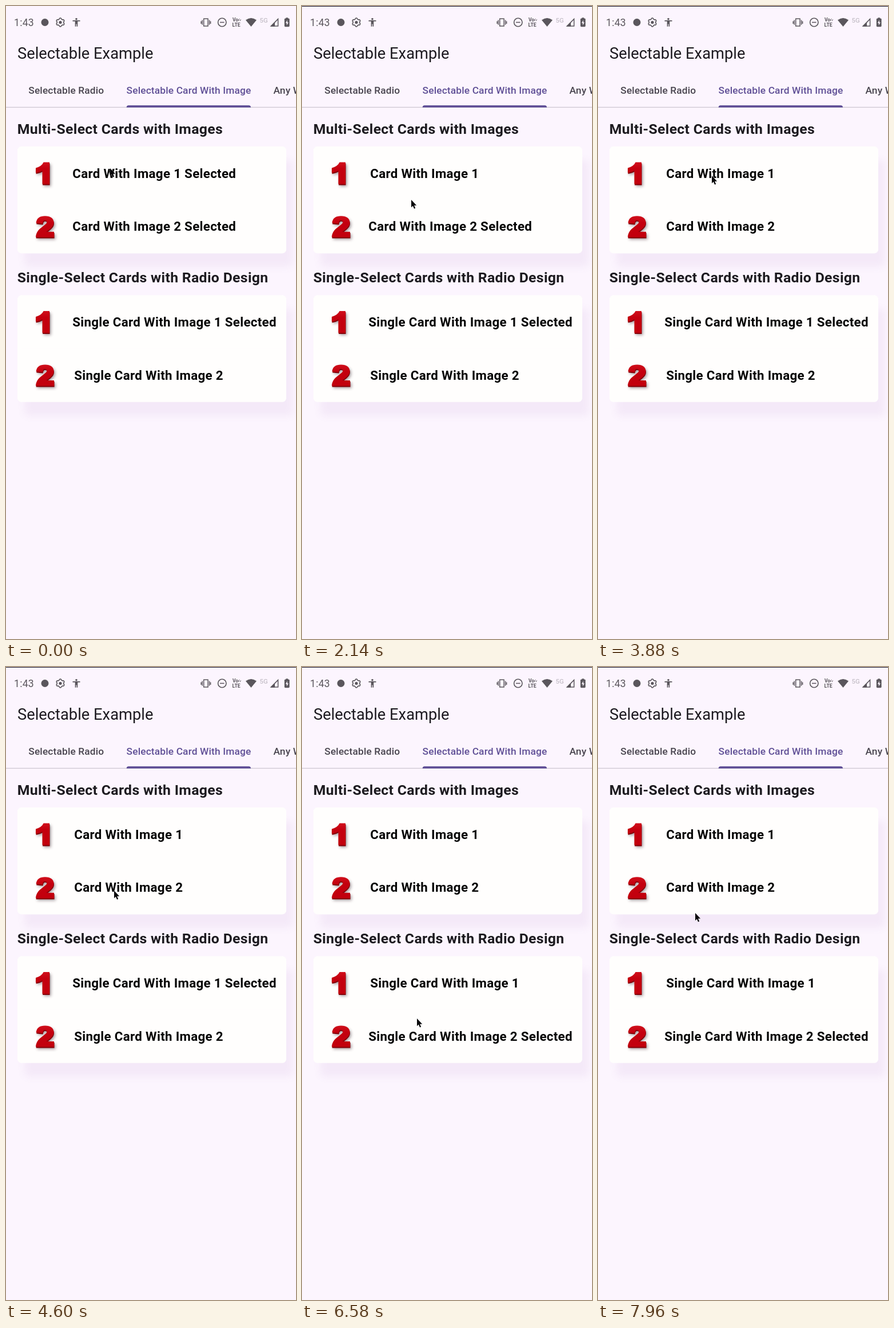
An HTML page with a canvas that plays this animation: 507x1104 px, repeating every 7.99 s.

```html
<!DOCTYPE html>
<html lang="en">
<head>
<meta charset="utf-8">
<title>Selectable Example</title>
<style>
html, body { margin: 0; width: 100%; height: 100%; overflow: hidden; background: #fcf5fe; }
canvas { display: block; width: 507px; height: 1104px; }
</style>
</head>
<body>
<canvas id="stage"></canvas>
<script>
const W = 507, H = 1104, LOOP = 7990, DP = 1.241;
const canvas = document.getElementById('stage');
const ctx = canvas.getContext('2d');
const ratio = window.devicePixelRatio || 1;
canvas.width = W * ratio;
canvas.height = H * ratio;

const BG = '#fcf5fe', INK = '#1d1b20', GREY = '#5a565c', PURPLE = '#5f4f96';

// Pointer stops: time, x, y
const PATH = [
  [0, 182, 283], [120, 181, 290], [560, 162, 386], [1000, 162, 386],
  [1500, 186, 287], [1660, 187, 286], [1810, 187, 286], [2140, 191, 338],
  [2420, 190, 388], [2620, 190, 388], [3000, 199, 296], [3900, 199, 296],
  [4500, 189, 390], [4700, 189, 390], [5500, 200, 668], [6070, 200, 668],
  [6580, 201, 613], [6790, 200, 552], [6880, 200, 552], [7450, 188, 642],
  [7690, 188, 642], [7960, 170, 429]
];

// Rows: icon digit, label, text baseline, card top, first state, toggle times
const ROWS = [
  { digit: 1, label: 'Card With Image 1', base: 300, top: 245, on: true, flips: [1560, 2960, 3640] },
  { digit: 2, label: 'Card With Image 2', base: 392.3, top: 338.4, on: true, flips: [600, 1020, 2460] },
  { digit: 1, label: 'Single Card With Image 1', base: 559, top: 504.6, on: true, flips: [5580, 6770, 7690] },
  { digit: 2, label: 'Single Card With Image 2', base: 652, top: 597.6, on: false, flips: [5580, 6770, 7690] }
];

function text(str, x, y, dp, weight, color, spacing = 0) {
  ctx.font = `${weight} ${dp * DP}px Roboto, sans-serif`;
  ctx.letterSpacing = spacing * DP + 'px';
  ctx.fillStyle = color;
  ctx.fillText(str, x, y);
}

function shape(d, fill) {
  ctx.fillStyle = fill;
  ctx.fill(new Path2D(d));
}

function line(d, width, color = GREY) {
  ctx.strokeStyle = color;
  ctx.lineWidth = width;
  ctx.stroke(new Path2D(d));
}

function circle(x, y, r, fill) {
  ctx.fillStyle = fill;
  ctx.beginPath();
  ctx.arc(x, y, r, 0, Math.PI * 2);
  ctx.fill();
}

function roundBox(x, y, w, h, r, fill) {
  ctx.fillStyle = fill;
  ctx.beginPath();
  ctx.roundRect(x, y, w, h, r);
  ctx.fill();
}

function gear(x, y) {
  ctx.save();
  ctx.translate(x, y);
  ctx.beginPath();
  for (let i = 0; i < 48; i++) {
    const a = i * Math.PI / 24;
    const r = 6.6 + Math.max(-0.8, Math.min(0.8, 1.6 * Math.cos(6 * a)));
    ctx.lineTo(r * Math.sin(a), r * Math.cos(a));
  }
  ctx.closePath();
  ctx.strokeStyle = GREY;
  ctx.lineWidth = 1.6;
  ctx.stroke();
  circle(0, 0, 2.6, GREY);
  ctx.restore();
}

function statusBar() {
  text('1:43', 14, 35, 14.2, 400, GREY, 0.2);
  circle(68, 28.5, 6.5, GREY);
  gear(95, 28.5);
  circle(123, 22.8, 1.8, GREY);
  shape('M116.5 25h13v1.8h-4.2v9h-1.7v-4.4h-1.2v4.4h-1.7v-9h-4.2z', GREY);

  line('M345.7 22.3h7.4v12.6h-7.4zM343.2 24.4v8.4M355.6 24.4v8.4M341.2 26.4v4.6M357.6 26.4v4.6', 1.5);
  line('M385 28.5a7.2 7.2 0 1 1-14.4 0a7.2 7.2 0 1 1 14.4 0zM374 28.5h7.6', 1.6);
  text('Vo', 396, 27, 6.8, 700, GREY);
  text('LTE', 395.6, 35.5, 7, 700, GREY);
  line('M406.5 25.8q0-3 2-3.4M409 26.2q0-2 2-2.6', 1);
  shape('M428.5 36L419 24.6Q428.5 17.4 438 24.6z', GREY);
  text('5G', 443.5, 29, 9.2, 500, '#c6c0c9');
  line('M475.6 22.6v12.5h-12.3z', 1.5);
  shape('M470 28.4v7.4h-7.4z', GREY);
  roundBox(486.8, 21.8, 8.8, 14.4, 1.4, GREY);
  ctx.fillRect(489.2, 20.4, 4, 2);
  shape('M491.8 24.6l-3 5.2h2v4l3-5.4h-2z', BG);
}

function header() {
  text('Selectable Example', 20, 91.6, 22, 400, INK);
  text('Selectable Radio', 39.3, 153, 14, 500, '#49454f', 0.1);
  text('Selectable Card With Image', 210.6, 153, 14, 500, PURPLE, 0.1);
  text('Any Widget', 467.6, 153, 14, 500, '#49454f', 0.1);
  ctx.fillStyle = '#cbc5d0';
  ctx.fillRect(0, 176, W, 1.2);
  roundBox(210.7, 173.2, 217.3, 3.8, [3.6, 3.6, 0, 0], PURPLE);
}

function cardShadow(top) {
  ctx.save();
  ctx.shadowColor = 'rgba(150, 90, 180, 0.075)';
  ctx.shadowBlur = 14 * ratio;
  ctx.shadowOffsetX = 12 * ratio;
  ctx.shadowOffsetY = 24 * ratio;
  roundBox(20, top, 470, 186, 7, '#fffefd');
  ctx.restore();
}

function digit(n, y) {
  const one = 'M24 0V38H11.5V14.5Q6.5 17.5 0 18.4V10Q10.5 7 13.6 0z';
  const two = 'M0.6 12.2C1.4 3.7 7 0 16.2 0C26 0 31.4 4.3 31.4 11C31.4 17.2 27.2 20.6 ' +
    '18.2 27.6H32V37H0C.6 27.4 6 22.8 13.8 17C18 13.8 19.4 12.6 19.4 10.6C19.4 8.6 18 7.5 16 7.5C13.6 7.5 12.5 9.2 12 13.2z';
  const d = n === 1 ? one : two;
  ctx.save();
  ctx.translate(52, y);
  ctx.save();
  ctx.shadowColor = 'rgba(60, 40, 50, 0.45)';
  ctx.shadowBlur = 5 * ratio;
  ctx.shadowOffsetX = 2 * ratio;
  ctx.shadowOffsetY = 2 * ratio;
  ctx.translate(0.6, 2);
  shape(d, '#850009');
  ctx.restore();
  const red = ctx.createLinearGradient(0, 0, 0, 38);
  red.addColorStop(0, '#d0101c');
  red.addColorStop(0.3, '#c4000f');
  red.addColorStop(1, '#c2000d');
  shape(d, red);
  ctx.restore();
}

function row(item, t) {
  const flips = item.flips.filter(at => t >= at).length;
  const on = item.on !== (flips % 2 === 1);
  roundBox(20, item.top, 470, 93, 7, '#fffefd');
  digit(item.digit, item.top + (item.digit === 1 ? 27.5 : 27.8));
  text(item.label + (on ? ' Selected' : ''), on ? 116.2 : 119.2, item.base, 18, 700, '#050505', 0.25);
}

function pointerAt(t) {
  const i = PATH.findIndex(p => p[0] > t);
  if (i < 0) return PATH[PATH.length - 1].slice(1);
  const [t0, x0, y0] = PATH[i - 1], [t1, x1, y1] = PATH[i];
  const u = (t - t0) / (t1 - t0), k = u * u * (3 - 2 * u);
  return [x0 + (x1 - x0) * k, y0 + (y1 - y0) * k];
}

function pointer(t) {
  const [x, y] = pointerAt(t);
  ctx.save();
  ctx.translate(x, y);
  const d = 'M0 0V13.2L2.9 10.5L5 15.6L7.2 14.7L5.1 9.8H9.2z';
  line(d, 0.8, 'rgba(255, 255, 255, 0.7)');
  shape(d, '#08080a');
  ctx.restore();
}

function draw(t) {
  ctx.setTransform(ratio, 0, 0, ratio, 0, 0);
  ctx.fillStyle = BG;
  ctx.fillRect(0, 0, W, H);
  statusBar();
  header();
  cardShadow(245);
  cardShadow(504.6);
  text('Multi-Select Cards with Images', 19.8, 223, 20, 700, INK, 0.25);
  text('Single-Select Cards with Radio Design', 19.8, 482.3, 20, 700, INK, 0.25);
  ROWS.forEach(item => row(item, t));
  pointer(t);
  if (t >= 30) {
    ctx.fillStyle = '#17162a';
    ctx.fillRect(0, 0, W, 1);
  }
}

const start = performance.now();
function tick() {
  draw((performance.now() - start) % LOOP);
  requestAnimationFrame(tick);
}
draw(0);
requestAnimationFrame(tick);
</script>
</body>
</html>
```
